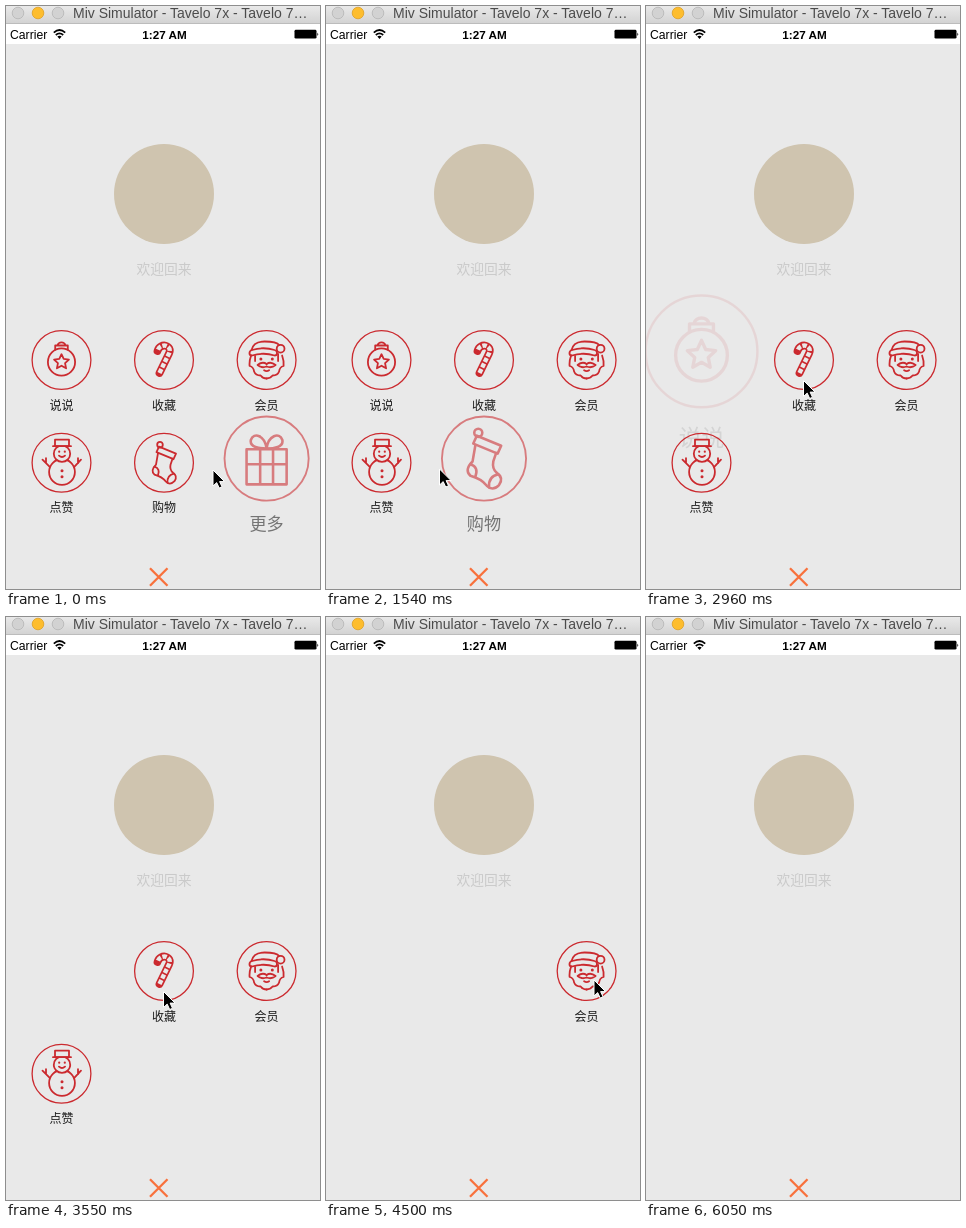
An HTML page that plays this animation: 314 px wide and 583 px high, repeating every 6370 ms.

```html
<!DOCTYPE html>
<html lang="zh-CN">
<head>
<meta charset="utf-8">
<title>Menu</title>
<style>
  html, body { margin: 0; width: 100%; height: 100%; overflow: hidden; background: #e9e9e9; }
  svg { display: block; width: 100%; height: 100%; }
  text { font-family: "Liberation Sans", sans-serif; }
  .cjk { font-family: "Noto Sans CJK SC", "Noto Sans CJK", sans-serif; text-anchor: middle; }
  .icon { fill: none; stroke: #cb2a2f; stroke-width: 1.8; stroke-linejoin: round; stroke-linecap: round; }
  .icon.pressed { stroke: #8a1d20; }
  .ring { stroke-width: 1.3; }
  .dot { fill: #cb2a2f; stroke: none; }
</style>
</head>
<body>
<svg viewBox="0 0 314 583">
  <defs>
    <linearGradient id="bar" x2="0" y2="1">
      <stop stop-color="#e9e9e9"/><stop offset="1" stop-color="#d2d2d2"/>
    </linearGradient>
  </defs>
  <rect width="314" height="583" fill="#e9e9e9"/>

  <rect width="314" height="18" fill="url(#bar)"/>
  <path d="M0 17.5H314" stroke="#bcbcbc"/>
  <g stroke-width=".8">
    <circle cx="12" cy="7" r="5.8" fill="#d2d2d2" stroke="#b5b5b5"/>
    <circle cx="32" cy="7" r="5.8" fill="#fdbd2e" stroke="#dfa023"/>
    <circle cx="52" cy="7" r="5.8" fill="#d2d2d2" stroke="#b5b5b5"/>
  </g>
  <text x="67" y="12" font-size="14" fill="#4b4b4b">Miv Simulator - Tavelo 7x - Tavelo 7…</text>

  <rect y="18" width="314" height="20" fill="#fff"/>
  <text x="4" y="32.5" font-size="12.2">Carrier</text>
  <g fill="none" stroke="#000" stroke-width="1.7">
    <path d="M47.8 26.6Q53.5 21.4 59.2 26.6M49.8 29Q53.5 25.6 57.2 29"/>
    <path d="M51.3 30.6Q53.5 28.8 55.7 30.6L53.5 33Z" fill="#000" stroke="none"/>
  </g>
  <text x="158.5" y="32.5" font-size="11.7" font-weight="bold" text-anchor="middle">1:27 AM</text>
  <rect x="288.5" y="23.8" width="22" height="8.8" rx="1.4"/>
  <path d="M311.4 26.5q1.8 1.7 0 3.5z"/>

  <circle cx="158" cy="188" r="50" fill="#cfc4af"/>
  <text class="cjk" x="158" y="268.4" font-size="13.8" fill="#cacaca">欢迎回来</text>

  <g id="menu"></g>
  <path d="M144 562.3l17.5 17.5m0-17.5l-17.5 17.5" stroke="#f8713c" stroke-width="2.3"/>
  <path id="cursor" d="M0 0V16L3.7 12.6 6.2 18 9 16.8 6.6 11.6H11.6Z" stroke="#fff" stroke-width="1"/>
</svg>
<script>
const LOOP = 6370, TICK = 118.2, LEAD = 7, GROWTH = 0.44, PIVOT = 9.5;

const starPoints = (cx, cy, r) => Array.from({ length: 10 }, (_, i) => {
  const a = i * Math.PI / 5, d = i % 2 ? r * 0.48 : r;
  return `${cx + d * Math.sin(a)},${cy - d * Math.cos(a)}`;
}).join(" ");
const dot = (x, y, r = 1.5) => `<circle class="dot" cx="${x}" cy="${y}" r="${r}"/>`;
const path = (d, attrs = "") => `<path d="${d}" ${attrs}/>`;
const mirrored = shape => shape + `<g transform="scale(-1 1)">${shape}</g>`;

const cane = "M-4.5 13L5 -6.5C9 -15 -4 -18 -6.5 -9";
const icons = {
  ornament: `<circle cy="2" r="13.6"/>
    ${path("M-6.3 -10.5V-14.5H6.3V-10.5M-4 -14.7A4.2 4.2 0 0 1 4 -14.7")}
    <polygon points="${starPoints(0, 2, 7.8)}"/>`,
  cane: path(cane, 'stroke-width="7.8"') +
    path(cane, 'style="stroke:#e9e9e9;stroke-width:4.4;stroke-linecap:butt" stroke-dasharray="4.4 1.7"'),
  santa: path("M-15 -10C-14 -15 -10 -18.5 -2 -18.5C6 -18.5 10.5 -18 12.5 -15") +
    path("M-14.5 -4.5C-18 -4.5 -18 -9 -14.5 -10Q-3 -13.5 8 -10C11.5 -9 11 -4.5 8 -4.5Q-3 -8 -14.5 -4.5Z") +
    '<circle cx="14" cy="-11.3" r="3.9"/>' +
    mirrored(
      path("M-15.5 -4.5Q-17.5 1 -17 6Q-13 7 -12.5 11.5Q-11 15.5 -6 15.5Q-3.5 18.5 0 18.5") +
      path("M0 4Q-4 1 -9 5Q-5 8.5 0 6.5") + dot(-5.7, -1)) +
    path("M-11.5 -4V1M11.5 -6V1M-2.5 10.3Q0 12 2.5 10.3"),
  snowman: '<circle cx=".5" cy="9.2" r="12.9"/><circle cx=".5" cy="-9" r="8.2" fill="#e9e9e9"/>' +
    path("M-6.5 -16.5V-23H7.5V-16.5Z", 'fill="#e9e9e9"') +
    path("M-8.5 -16.5H9.5M-2.5 -7Q.5 -4.3 3.5 -7") +
    path("M-12 4L-19 -3M-15.5 .5V-4.5M13 4L19.5 -3M16.5 .5V-4.5") +
    dot(-2.3, -11, 1.1) + dot(3.3, -11, 1.1) + dot(.5, 8) + dot(.5, 14),
  stocking: '<circle cx="-4" cy="-18" r="2.8"/>' +
    path("M-5 -16L12 -9L9.5 -3.5L-7.5 -10.5Z") +
    path("M-6 -9.5L-8 2Q-14 8 -9.5 12Q-2 14 2 19Q6 23 10.5 18.5Q14 13.5 9 10Q5.5 7 6.5 2L8.5 -4") +
    path("M-9.5 4Q-3.5 6 -6 12.5M3.5 20Q3 12.5 10 11"),
  gift: path("M-14 -6.5H14V18H-14ZM-14 4H14M-4.5 -6.5V18M4.5 -6.5V18") +
    path("M0 -7C-5 -7 -12 -8 -11 -13C-9 -19 -1 -16 0 -7C1 -16 9 -19 11 -13C12 -8 5 -7 0 -7Z")
};

// start: tick at which the tapped item begins to grow and fade
const items = [
  { icon: "ornament", label: "说说", x: 55.5, y: 354, start: 22.95, press: 21 },
  { icon: "cane", label: "收藏", x: 158, y: 354, start: 30, press: 28 },
  { icon: "santa", label: "会员", x: 260.6, y: 354, start: 40 },
  { icon: "snowman", label: "点赞", x: 55.5, y: 456.7, start: 33.9 },
  { icon: "stocking", label: "购物", x: 158, y: 456.7, start: 12.02, press: 10 },
  { icon: "gift", label: "更多", x: 260.6, y: 456.7, start: -0.98 }
];

// tick, x, y of the pointer tip
const pointerPath = [
  [0, 207, 464], [6, 158, 461], [11, 158, 461], [12, 148, 462], [13, 113.5, 463], [15, 58, 463],
  [16, 90, 450], [17, 125, 425], [18, 134, 398], [19, 102.5, 382.5], [21, 62, 369],
  [22, 62, 369], [24, 120, 373], [25, 157.5, 374.5], [30, 157.5, 374.5], [33, 64, 453],
  [35, 258.5, 382.5], [37, 272, 366], [38, 268, 363], [40, 268, 363], [42, 243.5, 364.5],
  [45, 168, 366], [46, 164, 380], [48, 200, 490], [50, 219, 560]
];
const POINTER_END = 51;

const menu = document.getElementById("menu");
const cursor = document.getElementById("cursor");
menu.innerHTML = items.map(({ icon, label }) => `<g>
  <g class="icon"><circle class="ring" r="29.4"/>${icons[icon]}</g>
  <text class="cjk" y="49.8" font-size="12" fill="#1c1c1c">${label}</text></g>`).join("");
items.forEach((item, i) => {
  item.node = menu.children[i];
  item.art = item.node.firstElementChild;
});

function pointerAt(tick) {
  const next = pointerPath.findIndex(p => p[0] > tick);
  if (next < 0) return pointerPath.at(-1).slice(1);
  const [t0, x0, y0] = pointerPath[next - 1], [t1, x1, y1] = pointerPath[next];
  const k = (tick - t0) / (t1 - t0);
  return [x0 + (x1 - x0) * k, y0 + (y1 - y0) * k];
}

function draw(now) {
  const tick = Math.floor((now % LOOP + LEAD) / TICK);
  for (const { node, art, x, y, start, press } of items) {
    const growth = Math.max(0, (tick - start) * GROWTH);
    node.setAttribute("visibility", growth < 1 ? "visible" : "hidden");
    node.setAttribute("opacity", Math.max(0, 1 - growth));
    node.setAttribute("transform",
      `translate(${x} ${y + PIVOT}) scale(${1 + growth}) translate(0 ${-PIVOT})`);
    art.classList.toggle("pressed", tick === press);
  }
  cursor.setAttribute("visibility", tick < POINTER_END ? "visible" : "hidden");
  cursor.setAttribute("transform", `translate(${pointerAt(tick)})`);
}

const origin = performance.now();
function frame() {
  draw(performance.now() - origin);
  requestAnimationFrame(frame);
}
frame();
</script>
</body>
</html>
```
